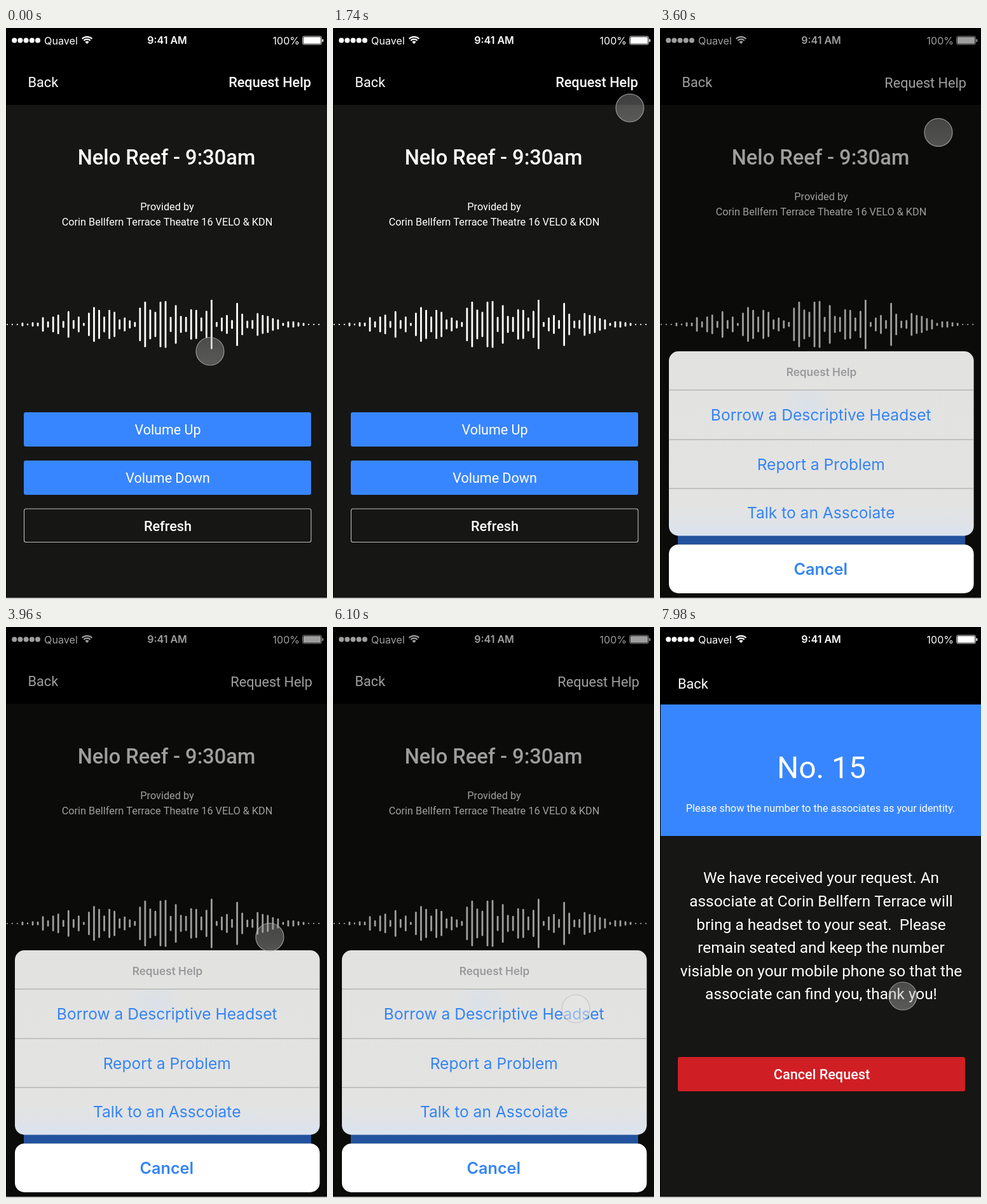
Animation of 505 by 899 pixels, one loop 8 s. Source, as an HTML page with a canvas:

```html
<!DOCTYPE html>
<html lang="en">
<head>
<meta charset="utf-8">
<title>Request help</title>
<style>
  html, body { margin: 0; width: 100%; height: 100%; overflow: hidden; background: #161614; }
  canvas { display: block; width: 505px; height: 899px; }
</style>
</head>
<body>
<canvas id="stage" width="505" height="899"></canvas>
<script>
const W = 505, H = 899, LOOP = 8000;
const BLUE = '#3886ff', LINK = '#3484f4';
const ROBOTO = 'Roboto, sans-serif', INTER = 'Inter, sans-serif';
const CENTER = 253.5;
const ctx = document.getElementById('stage').getContext('2d');

const BARS = [
  2, 2, 2, 6, 3, 7, 6, 23, 10, 25, 31, 11, 42, 14, 25, 5, 37, 55, 46, 25, 46,
  40, 16, 22, 13, 8, 53, 72, 47, 40, 72, 74, 24, 61, 27, 24, 48, 46, 22, 43, 78,
  8, 22, 30, 14, 68, 34, 12, 14, 36, 30, 27, 20, 16, 5, 10, 10, 7, 5, 2, 2, 2
];

// Pointer path: time, x, y
const PATH = [
  [0, 321, 509], [820, 458, 193], [1660, 466, 138], [1740, 467, 126],
  [2000, 452, 90], [2300, 447, 87], [3300, 447, 88], [3600, 438, 164],
  [3760, 424, 380], [3960, 415, 488], [4560, 385, 594], [5000, 382, 601],
  [6400, 382, 601], [7000, 382, 581], [8000, 382, 581]
];

function box(c, x, y, w, h, r, fill) {
  c.beginPath();
  c.roundRect(x, y, w, h, r);
  c.fillStyle = fill;
  c.fill();
}

function text(c, str, x, y, size, { weight = 400, family = ROBOTO, align = 'center', color = '#fff' } = {}) {
  c.font = `${weight} ${size}px ${family}`;
  c.textAlign = align;
  c.fillStyle = color;
  c.fillText(str, x, y);
}

function statusBar(c) {
  c.fillStyle = '#fff';
  for (let i = 0; i < 5; i++) {
    c.beginPath();
    c.arc(13.2 + i * 9.2, 19.5, 4, 0, 7);
    c.fill();
  }
  text(c, 'Quavel', 60, 25.5, 16.2, { family: INTER, align: 'left' });
  text(c, '9:41 AM', CENTER, 25.2, 16, { weight: 600, family: INTER });
  text(c, '100%', 462, 25.5, 16, { family: INTER, align: 'right' });

  const a = Math.PI * 1.25, b = Math.PI * 1.75;
  c.strokeStyle = '#fff';
  c.lineWidth = 2.2;
  for (const r of [7.4, 11.2]) {
    c.beginPath();
    c.arc(127.5, 25, r, a, b);
    c.stroke();
  }
  c.beginPath();
  c.moveTo(127.5, 25);
  c.arc(127.5, 25, 4.4, a, b);
  c.fill();

  c.lineWidth = 0.8;
  c.beginPath();
  c.roundRect(466.5, 13, 30, 13, 2.5);
  c.stroke();
  box(c, 467.8, 14.2, 27.5, 10.6, 1.5, '#fff');
  box(c, 497.5, 17.5, 1.8, 4.5, 1, '#fff');
}

function frame(c, headerHeight, body = '#161614') {
  box(c, 0, 0, W, H, 0, body);
  box(c, 0, 0, W, headerHeight, 0, '#000');
  statusBar(c);
}

function edges(c) {
  box(c, 0, 0, 1, H, 0, '#000');
  box(c, 0, 897, W, 2, 0, '#c4c4c4');
}

function wave(c) {
  BARS.forEach((h, i) => {
    const w = h < 4 ? 2.4 : 2.8;
    box(c, 1.8 + i * 8.04 - w / 2, 466.7 - h / 2, w, h, Math.min(w, h) / 2, '#fff');
  });
}

function showInfo(c, y) {
  text(c, 'Back', 34.5, 92.5, 21.7, { align: 'left' });
  text(c, 'Nelo Reef - 9:30am', 252.5, 215, 32.6, { weight: 500 });
  text(c, 'Provided by', CENTER, y, 16.3);
  text(c, 'Corin Bellfern Terrace Theatre 16 VELO & KDN', CENTER, y + 24, 16.3);
  wave(c);
}

function player(c) {
  frame(c, 121);
  showInfo(c, 287);
  text(c, 'Request Help', 480, 92.5, 21.7, { weight: 500, align: 'right' });
  box(c, 28, 605, 452, 54, 3, BLUE);
  box(c, 28, 681, 452, 54, 3, BLUE);
  text(c, 'Volume Up', 254.5, 640, 21.5);
  text(c, 'Volume Down', 254.5, 716, 21.5);
  c.beginPath();
  c.roundRect(28.5, 757, 451.5, 52.5, 3);
  c.strokeStyle = '#bdbdbc';
  c.lineWidth = 1.1;
  c.stroke();
  text(c, 'Refresh', 254.5, 791.5, 21.7, { weight: 500 });
  edges(c);
}

function sheet(c) {
  frame(c, 121, '#11110f');
  showInfo(c, 271);
  text(c, 'Request Help', 482, 94, 21.7, { align: 'right' });
  box(c, 28, 760, 452, 53.5, 0, BLUE);
  box(c, 0, 0, W, H, 0, 'rgba(0,0,0,.38)');

  const tint = c.createLinearGradient(0, 509, 0, 799);
  tint.addColorStop(0, '#e2e2e1');
  tint.addColorStop(0.84, '#e3e3e2');
  tint.addColorStop(1, '#dbe3ee');
  box(c, 14, 509, 479.6, 290.5, 15, tint);
  const glow = c.createRadialGradient(233, 595, 0, 233, 595, 45);
  glow.addColorStop(0, 'rgba(205,222,245,.4)');
  glow.addColorStop(1, 'rgba(205,222,245,0)');
  box(c, 188, 571, 90, 69, 0, glow);
  for (const y of [570, 648, 725]) box(c, 14, y - 0.5, 479.6, 1, 0, '#a2a2a2');
  box(c, 14, 813.2, 479.6, 76.8, 15, '#fff');

  const item = { family: INTER, color: LINK };
  text(c, 'Request Help', 254, 548, 17.2, { weight: 600, family: INTER, color: '#99999b' });
  text(c, 'Borrow a Descriptive Headset', 253.2, 618, 24.6, item);
  text(c, 'Report a Problem', 253.2, 695.8, 24.6, item);
  text(c, 'Talk to an Asscoiate', 253.2, 772, 24.6, item);
  text(c, 'Cancel', 252.8, 861, 25.2, { ...item, weight: 600 });
  edges(c);
}

function ticket(c) {
  frame(c, 122);
  text(c, 'Back', 28, 96.5, 21.7, { align: 'left' });
  box(c, 0, 122, W, 207, 0, BLUE);
  text(c, 'No. 15', 254, 238, 48);
  text(c, 'Please show the number to the associates as your identity.', 252.5, 291, 16.3);
  [
    'We have received your request. An',
    'associate at Corin Bellfern Terrace will',
    'bring a headset to your seat.  Please',
    'remain seated and keep the number',
    'visiable on your mobile phone so that the',
    'associate can find you, thank you!'
  ].forEach((line, i) => text(c, line, CENTER, 403.3 + i * 36.6, 24.4));
  box(c, 28, 677, 452, 54, 3, '#d01f24');
  text(c, 'Cancel Request', 254.5, 712, 21.7, { weight: 500 });
  edges(c);
}

function layer(draw) {
  const cv = document.createElement('canvas');
  cv.width = W;
  cv.height = H;
  draw(cv.getContext('2d'));
  return cv;
}

const ramp = (t, a, b) => Math.max(0, Math.min(1, (t - a) / (b - a)));
const pulse = (t, a, b, c, d) => ramp(t, a, b) - ramp(t, c, d);

function slope(i, k) {
  if (i < 1 || i >= PATH.length - 1) return 0;
  const [p, q, r] = [PATH[i - 1], PATH[i], PATH[i + 1]];
  const m = (q[k] - p[k]) / (q[0] - p[0]);
  const n = (r[k] - q[k]) / (r[0] - q[0]);
  return m * n > 0 ? 2 * m * n / (m + n) : 0;
}

// Monotone cubic interpolation along the path
function pointer(t) {
  let i = 0;
  while (i < PATH.length - 2 && t >= PATH[i + 1][0]) i++;
  const p = PATH[i], q = PATH[i + 1], d = q[0] - p[0], u = (t - p[0]) / d;
  const ease = u * u * (3 - 2 * u);
  return [1, 2].map(k =>
    p[k] + (q[k] - p[k]) * ease +
    d * u * (1 - u) * ((1 - u) * slope(i, k) - u * slope(i + 1, k)));
}

function drawPointer(t) {
  const [x, y] = pointer(t);
  const press = Math.max(pulse(t, 2500, 2600, 2720, 2820), pulse(t, 5900, 6000, 6140, 6260));
  const shade = v => {
    const tone = v + (230 - v) * press;
    return `rgba(${tone},${tone},${tone},${0.4 + 0.12 * press})`;
  };
  const fill = ctx.createLinearGradient(0, y - 22, 0, y + 22);
  fill.addColorStop(0, shade(155));
  fill.addColorStop(1, shade(190));
  ctx.beginPath();
  ctx.arc(x, y, 22, 0, 7);
  ctx.fillStyle = fill;
  ctx.fill();
  ctx.strokeStyle = 'rgba(185,185,188,.75)';
  ctx.lineWidth = 1.2;
  ctx.stroke();
}

const [playerView, sheetView, ticketView] = [player, sheet, ticket].map(layer);

function show(view, alpha) {
  if (alpha <= 0) return;
  ctx.globalAlpha = alpha;
  ctx.drawImage(view, 0, 0);
  ctx.globalAlpha = 1;
}

function render(now) {
  const t = now % LOOP;
  show(playerView, 1);
  show(sheetView, ramp(t, 2720, 2810));
  show(ticketView, ramp(t, 6130, 6230));
  drawPointer(t);
}

const start = performance.now();
function tick() {
  render(performance.now() - start);
  requestAnimationFrame(tick);
}
tick();
</script>
</body>
</html>
```
